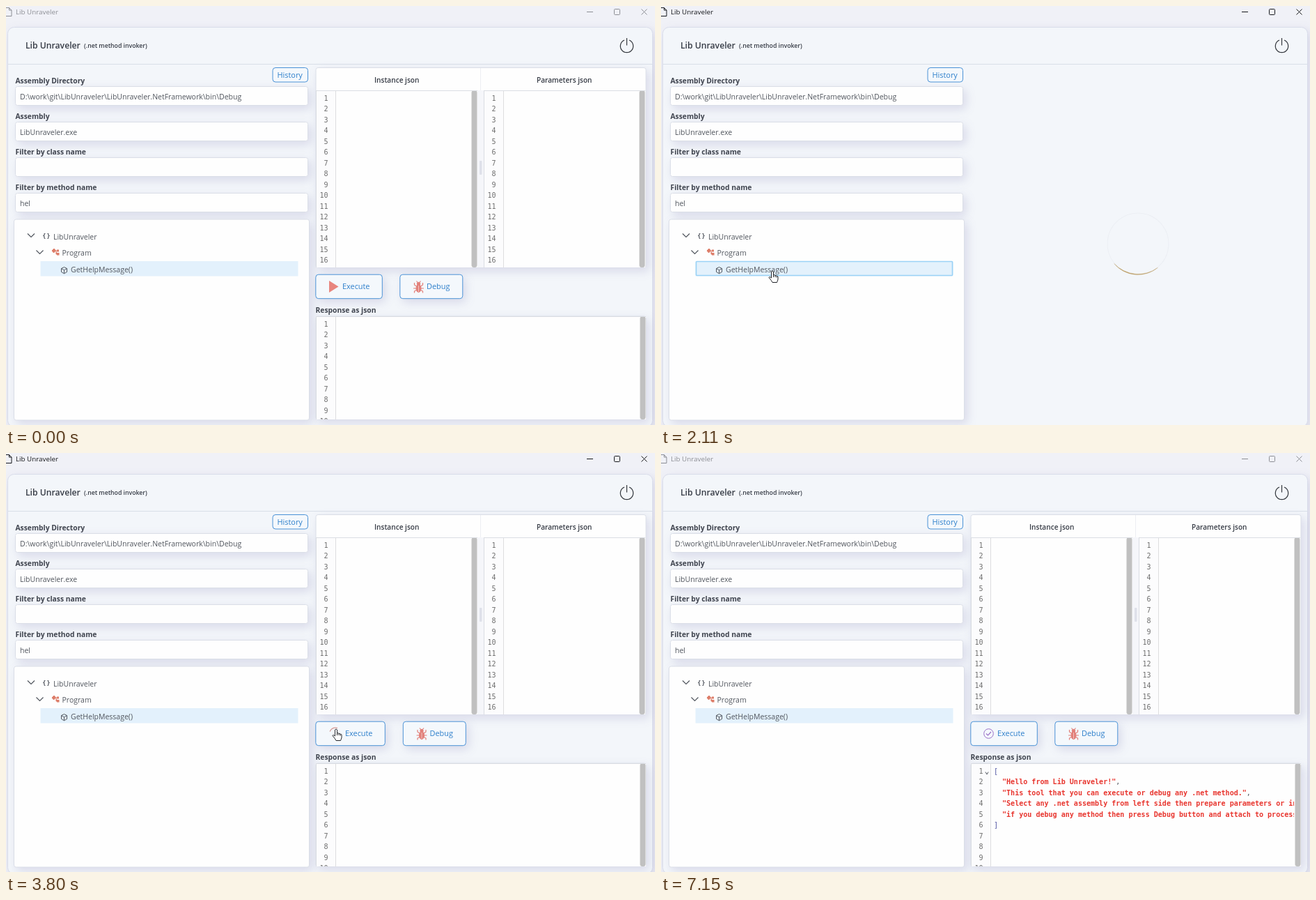
Animation of 932 by 601 pixels, one loop 7.22 s. Source, as an HTML page:

```html
<!DOCTYPE html>
<html lang="en">
<head>
<meta charset="utf-8">
<title>Lib Unraveler</title>
<style>
html, body { margin: 0; width: 100%; height: 100%; overflow: hidden; background: #f0f1f7; }
svg { display: block; }
text { font-family: "Open Sans", "Noto Sans", sans-serif; font-size: 10.5px; fill: #51565e; white-space: pre; }
.bold { font-weight: 600; fill: #363b45; }
.label { font-weight: 700; font-size: 10.3px; fill: #40454f; }
.head { font-size: 10.1px; }
.blue { font-size: 10.9px; fill: #2d7fcb; }
.mono { font-family: "DejaVu Sans Mono", monospace; font-size: 10.05px; }
.num { fill: #6e6e6e; text-anchor: end; }
.str { fill: #e8352e; font-weight: bold; }
.bracket { fill: #4d50a0; }
.shadow { filter: drop-shadow(4px 5px 7px rgba(70, 60, 140, .15)); }
.line { fill: none; stroke: #51565e; }
.button { fill: #f4f8fc; stroke: #4a92d6; }
.cursor { fill: #fff; stroke: #24262b; }
</style>
</head>
<body>
<svg id="stage" width="932" height="601" viewBox="0 0 932 601"></svg>
<script>
const LOOP = 7220, CLICK = 1300, LOAD = 1630, LOADED = 2380, RUN = 3590, DONE = 4450, BLUR = 7150;
const ENTER = 130, LEAVE = 6610;
const NAME = 'Lib Unraveler', ID = 'LibUnraveler';

const text = (x, y, s, cls = '', attrs = '') => `<text x="${x}" y="${y}" class="${cls}" ${attrs}>${s}</text>`;
const rect = (x, y, w, h, attrs = '') => `<rect x="${x}" y="${y}" width="${w}" height="${h}" ${attrs}/>`;
const path = (d, attrs = 'class="line"') => `<path d="${d}" ${attrs}/>`;
const circle = (x, y, r, attrs) => `<circle cx="${x}" cy="${y}" r="${r}" ${attrs}/>`;
const card = (x, y, w, h) => rect(x, y, w, h, 'rx="3" fill="#fefefe" stroke="#dadee7" class="shadow"');
const group = (id, body) => `<g id="${id}">${body}</g>`;

function field(y, label, value) {
  return text(13.5, y - 3.7, label, 'label') + card(13.5, y + .5, 420, 27) + text(20, y + 18.8, value);
}

function editor(x, y, w, h, lines, content = '') {
  let s = rect(0, 0, w, h, 'fill="#fefefe"') + rect(0, 0, 28, h, 'fill="#fcfcfd"') +
    path(`M28.5 0V${h}`, 'stroke="#dddddf"');
  for (let i = 0; i < lines; i++) s += text(17.6, 14.5 + 15.5 * i, i + 1, 'mono num');
  s += content + rect(w - 8.5, 0, 8, h, 'rx="3.5" fill="#c0c0c0"') +
    path(`M0 .5H${w}M.5 0V${h}`, 'fill="none" stroke="#dadde3"');
  return `<svg x="${x}" y="${y}" width="${w}" height="${h}">${s}</svg>`;
}

function response() {
  const quotes = [
    'Hello from ' + NAME + '!',
    'This tool that you can execute or debug any .net method.',
    'Select any .net assembly from left side then prepare parameters or instance',
    'if you debug any method then press Debug button and attach to process'
  ];
  const row = i => 14.5 + 15.5 * i;
  const body = quotes.map((q, i) =>
    text(45, row(i + 1), `<tspan class="str">"${q}"</tspan>${i < 3 ? ',' : ''}`, 'mono')).join('');
  return group('answer', path('M21 12.5l2 3.5 2-3.5') + text(33, row(0), '[', 'mono bracket') +
    `<svg width="464" height="148">${body}</svg>` + text(33, row(5), ']', 'mono bracket'));
}

const titleBar = group('bar',
  path('M-2 2.5H4.5L8 6V14.5H-2M4.5 2.5V6H8M834 8.5H843M912.5 4.5l8 8m0-8l-8 8', 'fill="none" stroke="currentColor"') +
  rect(873.5, 4.5, 8, 8, 'rx="1" fill="none" stroke="currentColor"') +
  text(14, 12.3, NAME, '', 'style="font-size:9.8px;fill:currentColor"'));

const header =
  rect(2.5, 30.5, 926, 573, 'rx="9" fill="#f3f6fa" stroke="#d8dcea" class="shadow"') +
  path('M3 83.5H928', 'stroke="#d9dfe8"') +
  text(28, 60.5, NAME, 'bold', 'style="font-size:12.2px"') +
  text(112, 60, '(.net method invoker)', 'bold', 'style="font-size:8.7px"') +
  path('M888 49A9.2 9.2 0 1 0 895 49M891.5 46V56.5', 'fill="none" stroke="#33373d" stroke-width="1.2"');

const cube = path('M83.5 374.5l4 2v5l-4 2.3-4-2.3v-5zM79.5 376.5l4 2.3 4-2.3M83.5 379v4.5');
const tree = card(11.5, 306, 424, 288) +
  path('M31 326.5l5 5 5-5M43.5 350.5l5 5 5-5', 'class="line" stroke-width="1.2"') +
  text(53, 333, '{ }', 'bold', 'style="font-size:9.5px"') +
  path('M66 351l3-3 2.5 3-3 3zM71 351h3M72 352v4h2', 'fill="#dd7d69" stroke="#dd7d69"') +
  rect(73, 349.5, 3, 3, 'fill="#dd7d69"') + rect(73, 354, 3.5, 3.5, 'fill="#dd7d69"') +
  text(68, 334.5, ID) + text(80.5, 357.7, 'Program') +
  rect(49.5, 366, 370, 21.5, 'fill="#e3f1fc"') +
  group('focus', rect(50.5, 366.5, 368, 20, 'rx="1" fill="none" stroke="#9ad2f6" stroke-width="1.6"')) +
  cube + text(93, 381.7, 'GetHelpMessage()');

const left =
  field(115, 'Assembly Directory', `D:\\work\\git\\${ID}\\${ID}.NetFramework\\bin\\Debug`) +
  field(166, 'Assembly', ID + '.exe') + field(217, 'Filter by class name', '') +
  field(268, 'Filter by method name', 'hel') +
  rect(383, 88.5, 50.5, 20.5, 'rx="4" class="button"') + text(389.5, 103, 'History', 'blue') + tree;

const bug = '<g transform="translate(592.5 403)" fill="#e2807a" stroke="#e2807a">' +
  '<ellipse cy="2" rx="3.5" ry="5.5"/>' + circle(0, -4.5, 2.2, '') +
  path('M-3-1L-6-3V-6M3-1L6-3V-6M-3 2H-7.5M3 2H7.5M-3 4.5L-6 6V8.5M3 4.5L6 6V8.5M-1-6L-3-8.5M1-6L3-8.5', 'fill="none" stroke-width="1.2"') +
  path('M0-2V7', 'stroke="#f4d5d3" stroke-width=".8"') + '</g>';

const buttons =
  rect(444.8, 385.2, 95.5, 34.5, 'id="execute" rx="4" class="button shadow"') +
  path('M464 394L477.5 402.5 464 411z', 'id="play" fill="#e8857e"') +
  group('check', circle(470.5, 402.5, 6.8, 'fill="none" stroke="#9a70c8"') +
    path('M467 402.5l2.5 2.5 4.5-5', 'fill="none" stroke="#9a70c8" stroke-width="1.2"')) +
  path('M-6-6A8.5 8.5 0 0 1 6-6', 'id="busy" fill="none" stroke="#cf827c"') +
  group('caption', text(483, 406, 'Execute', 'blue')) +
  group('debug', rect(565.8, 385.2, 90, 34.5, 'rx="4" class="button shadow"') + bug + text(604, 406, 'Debug', 'blue'));

const right = group('panel',
  card(445, 88.5, 474, 286.5) + rect(677, 121, 9, 254, 'fill="#f5f6fa"') +
  path('M681.5 89V121', 'stroke="#eceef3"') +
  text(529, 109.5, 'Instance json', 'bold head') + text(762, 109.5, 'Parameters json', 'bold head') +
  editor(445, 121, 232, 254, 16) + editor(686, 121, 232, 254, 16) +
  rect(680, 222, 3.5, 20, 'rx="1" fill="#dfe1ea"') + buttons +
  text(444.5, 440, 'Response as json', 'label') +
  card(445, 445, 474, 148) + editor(445, 445, 474, 148, 10, response()));

const spinner = group('spinner', circle(0, 0, 44, 'fill="none" stroke="#eceff4"') +
  path('M-31.5 31.5A44.5 44.5 0 0 0 31.5 31.5A47.5 47.5 0 0 1-31.5 31.5Z', 'fill="#bfa26c" stroke="#bfa26c" stroke-width=".3"'));

const cursor = group('cursor',
  path('M0 0V12L2.8 9.5 4.6 13.5 6.5 12.7 4.8 8.8H8.5Z', 'id="arrow" class="cursor"') +
  path('M-1.5 1Q0-1 1.5 1V6Q3 5 4 6.5 5.5 5.8 6.2 7.2 8 7 8 8.5V12Q7.5 14 6.5 16.5H0Q-1 14-5 9.5-4.5 7.5-1.5 10ZM1.5 6V9M4 6.5V9M6.2 7.2V9.5', 'id="hand" class="cursor"') +
  path('M-2.5-5.5H2.5M0-5.5V5.5M-2.5 5.5H2.5', 'id="beam" class="cursor"'));

const $ = id => document.getElementById(id);
$('stage').innerHTML = titleBar + header + left + right + spinner + cursor;

// Pointer stops: time, x, y
const stops = [
  [ENTER, 846, 592], [400, 143, 411], [500, 143, 411], [890, 146, 380], [980, 146, 380], [CLICK, 160, 380],
  [2350, 160, 380], [2640, 263, 379], [2790, 263, 379], [3520, 474, 396], [4450, 474, 396], [4910, 496, 393],
  [5400, 496, 393], [6110, 859, 560], [6150, 859, 560], [LEAVE, 859, 603]
];

function pointer(t) {
  const i = Math.max(1, stops.findIndex(s => t < s[0]));
  const [t0, x0, y0] = stops[i - 1], [t1, x1, y1] = stops[i];
  const p = (t - t0) / (t1 - t0), e = p * p * (3 - 2 * p);
  return [x0 + (x1 - x0) * e, y0 + (y1 - y0) * e];
}

function shape(x, y) {
  const inside = (l, top, r, b) => x > l && x < r && y > top && y < b;
  if (inside(50, 366, 419, 388) || inside(445, 385, 540, 420) || inside(566, 385, 656, 420)) return 'hand';
  return inside(474, 445, 909, 593) ? 'beam' : 'arrow';
}

const show = (id, on) => $(id).style.display = on ? '' : 'none';
const place = (id, x, y = 0, turn = 0) => $(id).setAttribute('transform', `translate(${x} ${y}) rotate(${turn})`);

function draw(t) {
  const within = (a, b) => t >= a && t < b;
  const loading = within(LOAD, LOADED), running = within(RUN, DONE), moving = within(ENTER, LEAVE);
  $('bar').style.color = within(CLICK, BLUR) ? '#16181c' : '#8d8f95';
  show('focus', within(CLICK, RUN));
  show('panel', !loading);
  show('spinner', loading);
  place('spinner', 685, 341, (t - 2110) * .36 + 5);
  show('play', t < RUN);
  show('busy', running);
  place('busy', 473, 402.5, (t - 3800) * .36 - 25);
  show('check', t >= DONE);
  show('answer', t >= DONE);
  $('execute').setAttribute('width', running ? 99.5 : 95.5);
  place('caption', running ? 4 : 0);
  place('debug', running ? 4.5 : 0);
  show('cursor', moving);
  if (moving) {
    const [x, y] = pointer(t), kind = shape(x, y);
    place('cursor', x, y);
    for (const id of ['arrow', 'hand', 'beam']) show(id, id === kind);
  }
}

const start = performance.now();
function tick() {
  draw((performance.now() - start) % LOOP);
  requestAnimationFrame(tick);
}
tick();
</script>
</body>
</html>
```
